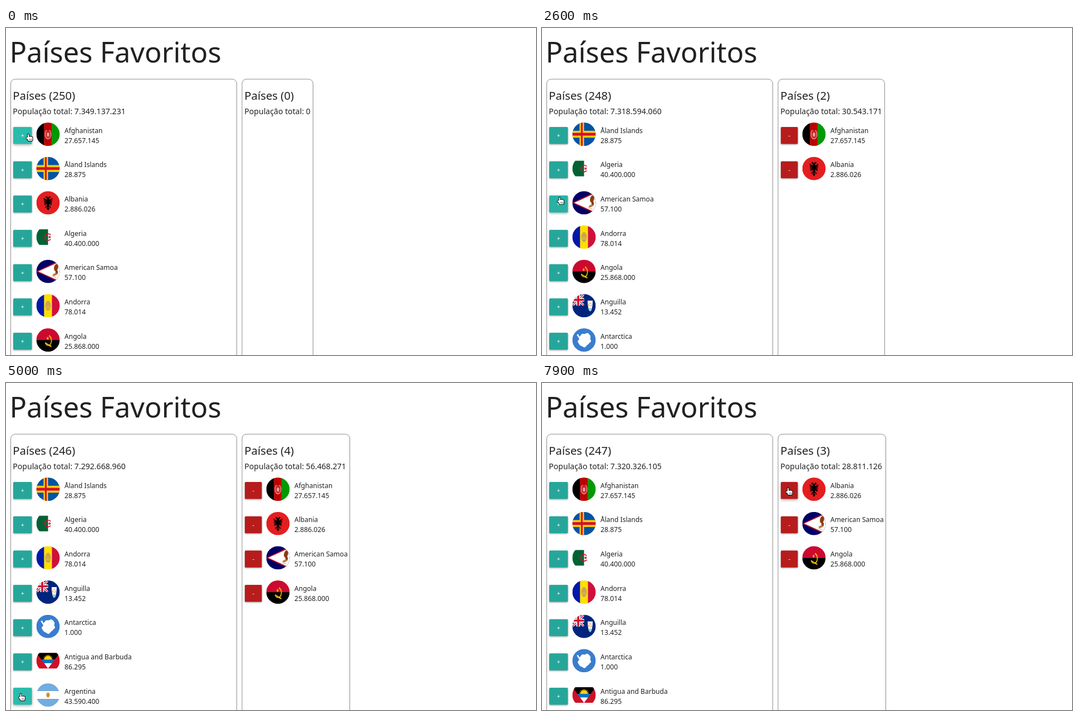
Recreate the animation shown at these times as an HTML page with a canvas. Size 952x588 px, loop 8 s.

```html
<!DOCTYPE html>
<html lang="pt">
<head>
<meta charset="utf-8">
<title>Países Favoritos</title>
<style>
html, body { margin: 0; width: 100%; height: 100%; overflow: hidden; background: #fff; }
canvas { display: block; width: 952px; height: 588px; }
</style>
</head>
<body>
<canvas id="stage"></canvas>
<script>
const W = 952, H = 588, LOOP = 8000, ROW = 61.67, ROWS = 7, R = 21;
const FONT = '"Noto Sans", "Open Sans", sans-serif';
const INK = '#212121';
const LEFT = { x: 13, button: 33.5, flag: 75.5, name: 105 };
const RIGHT = { x: 429, button: 30.5, flag: 488.5, name: 518 };
const canvas = document.getElementById('stage');
const dpr = window.devicePixelRatio || 1;
canvas.width = W * dpr;
canvas.height = H * dpr;
const c = canvas.getContext('2d');

// ---- shapes; flags are drawn around (0, 0) ----
function box(color, x, y, w, h) {
  c.fillStyle = color;
  c.fillRect(x, y, w, h);
}
function field(color) { box(color, -R, -R, 2 * R, 2 * R); }
function poly(color, ...p) {
  c.fillStyle = color;
  c.beginPath();
  for (let i = 0; i < p.length; i += 2) c.lineTo(p[i], p[i + 1]);
  c.closePath();
  c.fill();
}
function oval(color, x, y, rx, ry = rx, tilt = 0) {
  c.fillStyle = color;
  c.beginPath();
  c.ellipse(x, y, rx, ry, tilt, 0, 7);
  c.fill();
}
function line(color, width, x0, y0, x1, y1) {
  c.strokeStyle = color;
  c.lineWidth = width;
  c.beginPath();
  c.moveTo(x0, y0);
  c.lineTo(x1, y1);
  c.stroke();
}
function arc(color, width, x, y, r, from = 0, to = 7) {
  c.strokeStyle = color;
  c.lineWidth = width;
  c.beginPath();
  c.arc(x, y, r, from, to);
  c.stroke();
}
function polar(color, x, y, count, radius, turn = -Math.PI / 2) {
  const p = [];
  for (let i = 0; i < count; i++) {
    const a = turn + i * 2 * Math.PI / count;
    p.push(x + radius(i, a) * Math.cos(a), y + radius(i, a) * Math.sin(a));
  }
  poly(color, ...p);
}
function star(color, x, y, r, points = 5, inner = 0.4, turn) {
  polar(color, x, y, points * 2, i => i % 2 ? r * inner : r, turn);
}
function columns(a, b, d) {
  [a, b, d].forEach((k, i) => box(k, -R + i * 14, -R, 14.2, 42));
}
function bands(...colors) {
  const h = 42 / colors.length;
  colors.forEach((k, i) => box(k, -R, -R + i * h, 42, h + 0.2));
}
function clipped(trace, paint) {
  c.save();
  c.beginPath();
  trace();
  c.clip();
  paint();
  c.restore();
}
function squeezed(sx, paint) {
  c.save();
  c.scale(sx, 1);
  paint();
  c.restore();
}

// ---- flags ----
function afghanistan() {
  columns('#000', '#bf0000', '#009a00');
  squeezed(0.67, () => {
    arc('#eec4c4', 1.3, 0, 0, 8.2, -1.1, 4.25);
    arc('#dd8080', 1, 0, 0, 6);
    oval('#e6a5a5', 0, 0.5, 3.4, 4);
  });
}
function aland() {
  const cross = (color, v, h) => {
    box(color, -4 - v / 2, -R, v, 42);
    box(color, -R, -h / 2, 42, h);
  };
  field('#0053a5');
  cross('#ffce00', 8.1, 12.4);
  cross('#d21034', 3.2, 5);
}
function albania() {
  field('#e41e20');
  oval('#000', 0, 0, 2.4, 9);
  for (const s of [-1, 1]) {
    line('#000', 2.2, s, -7, s * 2.6, -11.5);
    line('#000', 1.4, s * 2, -11, s * 4.8, -10);
    for (let i = 0; i < 5; i++) line('#000', 1.6, s, i - 4, s * (8 - i * 0.4), i * 3 - 8);
    line('#000', 1.5, s, 5, s * 5, 9);
  }
  poly('#000', -3, 9, 3, 9, 0, 14);
}
function algeria() {
  field('#fff');
  box('#006233', -R, -14, R, 28);
  arc('#d21034', 1.7, 0.2, 0, 5.9, 0.7, 2 * Math.PI - 0.7);
  star('#d21034', 2.8, 0, 3.2, 5, 0.4, Math.PI);
}
function samoa() {
  field('#000066');
  poly('#bd1021', -R, 0, R, -20, R, 20);
  poly('#fff', -17.5, 0, R, -17.5, R, 17.5);
  oval('#8b3a0e', 14.5, -7, 3.6, 6.5, 0.25);
  oval('#8b3a0e', 15.5, 1.5, 2.2, 4);
  oval('#b97a45', 12.5, 5.5, 4.5, 2, -0.4);
  line('#d8a23a', 1, 8, 9, 15, 11);
}
function andorra() {
  columns('#0018a8', '#fedf00', '#d0103a');
  oval('#c9a355', 0, 0, 5, 9);
  for (const x of [-3.6, 0.4]) {
    box('#dda04a', x, -5.5, 3.2, 4.8);
    box('#dcb540', x, 0.3, 3.2, 5);
  }
}
function angola() {
  bands('#cc092f', '#000');
  const gold = '#ffcb00';
  squeezed(0.67, () => {
    arc(gold, 1.8, 0, 1, 8.8, -1.3, 1.5);
    c.setLineDash([1.5, 1.5]);
    arc(gold, 1.3, 0, 1, 10.2, -1.2, 1.4);
    c.setLineDash([]);
    arc(gold, 1.4, 0, 2, 8, 1.6, 2.8);
    line(gold, 2, -8, 5, 9, 12);
    star(gold, -1, -3, 3.6);
  });
}
function anguilla() {
  field('#00247d');
  clipped(() => c.rect(-R, -R, R, R), () => {
    for (const [color, diagonal, cross] of [['#fff', 4, 6.4], ['#cf142b', 1.4, 3.6]]) {
      line(color, diagonal, -R, -R, 0, 0);
      line(color, diagonal, 0, -R, -R, 0);
      line('#fff', 6.4, -R / 2, -R, -R / 2, 0);
      line('#fff', 6.4, -R, -R / 2, 0, -R / 2);
      line(color, cross, -R / 2, -R, -R / 2, 0);
      line(color, cross, -R, -R / 2, 0, -R / 2);
    }
  });
  clipped(() => c.ellipse(11, -9, 4.6, 19, 0, 0, Math.PI), () => {
    field('#fff');
    box('#8fd0e6', 0, 4, R, 7);
  });
  for (let i = 0; i < 3; i++) arc('#ef9a2d', 1.3, 11, -2, 2.6, i * 2.1, i * 2.1 + 1.5);
}
function antarctica() {
  field('#3a7dce');
  polar('#fff', 1, 0, 40, (i, a) => 11.6 + 1.3 * Math.sin(2 * a + 3.6) + 0.8 * Math.sin(5 * a) + 0.5 * Math.sin(9 * a));
  line('#fff', 2.6, -7, -2, -12, -10);
}
function antigua() {
  field('#fff');
  box('#ce1126', -R, -14, 42, 28);
  clipped(() => { c.moveTo(-R, -14); c.lineTo(R, -14); c.lineTo(0, 14); }, () => {
    box('#000', -R, -14, 42, 12);
    star('#fcd116', 0, -2, 9.5, 16, 0.62);
    box('#0072c6', -R, -2, 42, 6.5);
    box('#fff', -R, 4.5, 42, 10);
  });
}
function argentina() {
  bands('#74acdf', '#fff', '#74acdf');
  squeezed(0.7, () => {
    star('#e0b04a', 0, 0, 5.8, 16, 0.66);
    oval('#c98c2c', 0, 0, 3.4);
  });
}
function armenia() {
  bands('#d90012', '#0033a0', '#f2a800');
}

// ---- data ----
const WORLD = 7349137231, COUNT = 250;
const countries = [
  ['Afghanistan', 27657145, afghanistan],
  ['Åland Islands', 28875, aland],
  ['Albania', 2886026, albania],
  ['Algeria', 40400000, algeria],
  ['American Samoa', 57100, samoa],
  ['Andorra', 78014, andorra],
  ['Angola', 25868000, angola],
  ['Anguilla', 13452, anguilla],
  ['Antarctica', 1000, antarctica],
  ['Antigua and Barbuda', 86295, antigua],
  ['Argentina', 43590400, argentina],
  ['Armenia', 2994400, armenia]
].map(([name, people, flag]) => ({ name, people, flag }));

// pointer arrives, clicks, country that changes sides
const clicks = [
  [1550, 2000, 'Albania'], [2700, 3000, 'American Samoa'], [3600, 4000, 'Angola'],
  [4950, 5500, 'Argentina'], [6400, 6800, 'Argentina'], [7500, 7700, 'Afghanistan']
].map(([arrive, time, name]) => ({ arrive, time, name }));
clicks.unshift({ arrive: 0, time: 1000, name: 'Afghanistan' });

function split(t) {
  const moved = k => clicks.filter(e => e.name === k.name && e.time <= t).length % 2;
  return { left: countries.filter(k => !moved(k)), right: countries.filter(moved) };
}

// ---- pointer: rests on each button, then moves on to the next ----
const stops = clicks.map(({ arrive, time, name }) => {
  const { left, right } = split(time - 1);
  const row = list => list.findIndex(k => k.name === name);
  const chosen = row(right) >= 0;
  return {
    arrive, leave: time + 250,
    x: chosen ? 444 : 28.5,
    y: 195 + ROW * row(chosen ? right : left)
  };
});
Object.assign(stops[0], { x: 42, y: 197 });
stops.push({ arrive: 6000, leave: 6000, x: 550, y: 446 });
stops.sort((a, b) => a.arrive - b.arrive);

function pointer(t) {
  const i = stops.findLastIndex(s => s.arrive <= t);
  const a = stops[i], b = stops[i + 1];
  if (!b || t <= a.leave) return a;
  const u = (t - a.leave) / (b.arrive - a.leave), e = u * u * (3 - 2 * u);
  return { x: a.x + (b.x - a.x) * e + 8 * Math.sin(Math.PI * u), y: a.y + (b.y - a.y) * e };
}
function over(p, side, row) {
  const dx = p.x - side.x, dy = p.y - 178 - row * ROW;
  return dx >= 0 && dx <= side.button && dy >= -8 && dy <= 31;
}
// share of the last 200 ms spent over a button
function hover(t, side, row) {
  let n = 0;
  for (let k = 0; k < 10; k++) n += over(pointer(Math.max(0, t - k * 20)), side, row);
  return n / 10;
}

// ---- page ----
const dots = n => String(n).replace(/\B(?=(\d{3})+$)/g, '.');
const label = n => 'População total: ' + dots(n);
function text(str, x, y, size, color = INK) {
  c.font = size + 'px ' + FONT;
  c.fillStyle = color;
  c.fillText(str, x, y);
}
function width(str, size) {
  c.font = size + 'px ' + FONT;
  return c.measureText(str).width;
}
function round(x, y, w, h, r) {
  c.beginPath();
  c.roundRect(x, y, w, h, r);
}
function panel(x, right) {
  c.strokeStyle = '#8c8c8c';
  c.lineWidth = 1;
  round(x, 92, right - x, H, 8);
  c.stroke();
}
function button(x, y, w, color, sign, lift) {
  c.save();
  c.shadowColor = 'rgba(0,0,0,.35)';
  c.shadowBlur = (3 + lift * 2) * dpr;
  c.shadowOffsetY = (1.2 + lift * 0.6) * dpr;
  c.fillStyle = color;
  round(x, y, w, 30.5, 1.6);
  c.fill();
  c.restore();
  c.textAlign = 'center';
  text(sign, x + w / 2, y + 19, 10.5, '#fff');
  c.textAlign = 'left';
}
function column(side, items, count, people, t) {
  const red = side === RIGHT;
  text(`Países (${count})`, side.x - 0.7, 129, 20.3);
  text(label(people), side.x - 0.7, 154.5, 14.1);
  items.slice(0, ROWS).forEach((item, row) => {
    const dy = row * ROW, h = hover(t, side, row);
    const teal = `rgb(${38 + 5 * h},${166 + 21 * h},${154 + 19 * h})`;
    button(side.x, 178 + dy, side.button, red ? '#b71c1c' : teal, red ? '-' : '+', h);
    c.save();
    c.translate(side.flag, 191 + dy);
    clipped(() => c.arc(0, 0, R, 0, 7), item.flag);
    c.restore();
    text(item.name, side.name, 188.5 + dy, 12.05);
    text(dots(item.people), side.name, 206.7 + dy, 12.25);
  });
}
function hand() {
  const parts = grow => {
    c.fillStyle = grow ? '#000' : '#fff';
    const part = (x, y, w, h, r) => {
      round(x - grow, y - grow, w + 2 * grow, h + 2 * grow, r + grow);
      c.fill();
    };
    part(-3, -6.3, 2, 10, 1);
    part(-5.6, -0.4, 4, 3, 1.4);
    part(-3, -1.6, 8.6, 7.6, 2);
  };
  parts(0.9);
  parts(0);
  for (let x = 0; x < 5; x += 2) line('#000', 0.6, x, 2, x, 4.6);
}
function arrow() {
  c.lineWidth = 1.5;
  c.strokeStyle = '#e8e8e8';
  poly('#1a1a1a', -3, -7, -3, 4.6, -0.6, 2.6, 1.1, 6.6, 2.9, 5.8, 1.2, 2, 4.8, 1.6);
  c.stroke();
  c.fill();
}

function draw(t) {
  c.setTransform(dpr, 0, 0, dpr, 0, 0);
  box('#fff', 0, 0, W, H);
  const { left, right } = split(t);
  const sum = right.reduce((n, k) => n + k.people, 0);
  const edge = Math.max(RIGHT.x + width(label(sum), 14.1), ...right.map(k => RIGHT.name + width(k.name, 12.05)));

  text('Países Favoritos', 6.5, 62, 50.6);
  panel(8.5, 414.5);
  panel(424, Math.round(edge + 4.6) - 0.5);
  column(LEFT, left, COUNT - right.length, WORLD - sum, t);
  column(RIGHT, right, right.length, sum, t);

  const p = pointer(t);
  const hit = (list, side) => list.slice(0, ROWS).some((_, row) => over(p, side, row));
  c.translate(p.x, p.y);
  hit(left, LEFT) || hit(right, RIGHT) ? hand() : arrow();
}

const start = performance.now();
function frame() {
  draw((performance.now() - start) % LOOP);
  requestAnimationFrame(frame);
}
frame();
</script>
</body>
</html>
```
